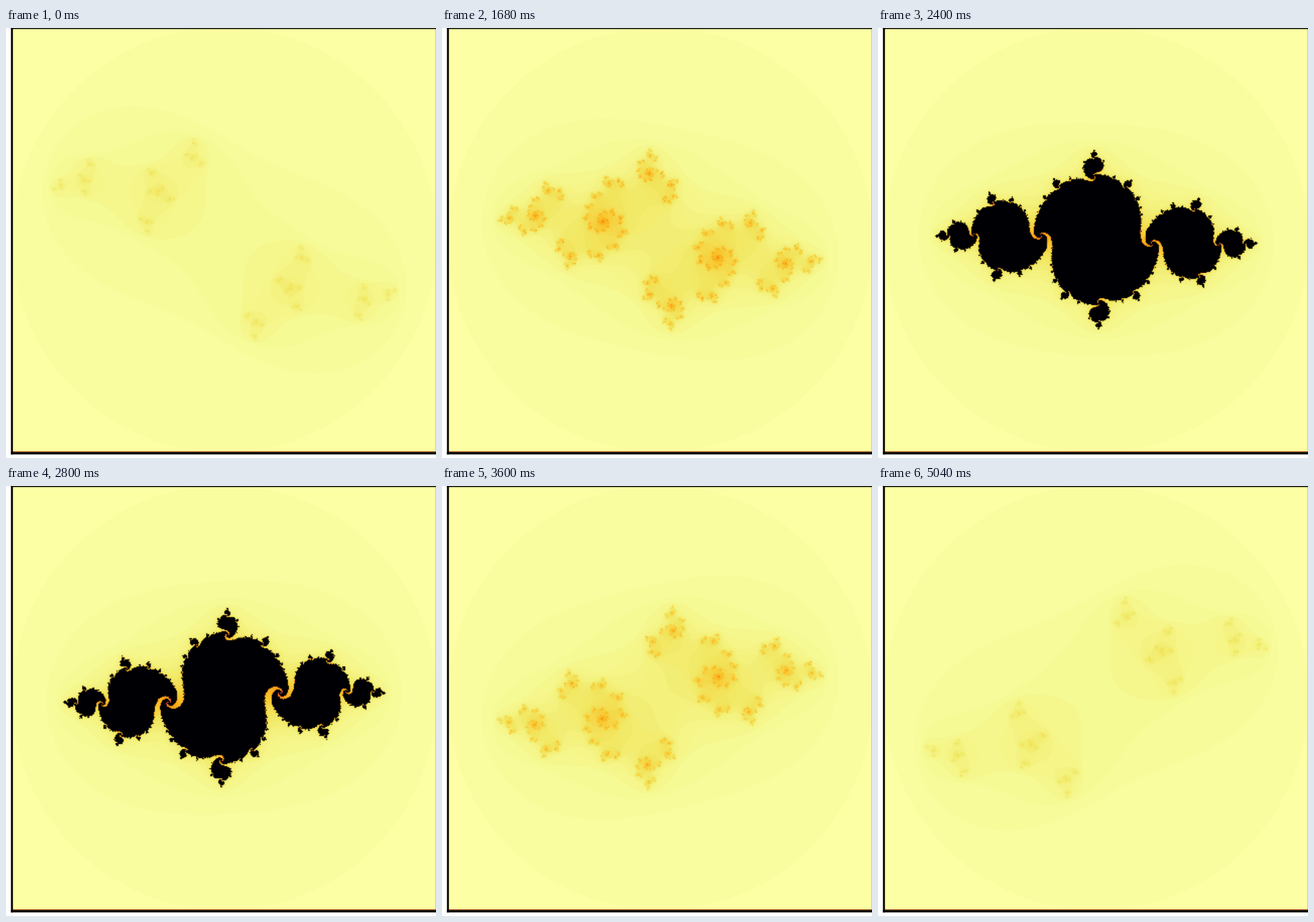
An HTML page with a canvas that plays this animation: 640x640 px, repeating every 5.12 s.

```html
<!DOCTYPE html>
<html lang="en">
<head>
<meta charset="utf-8">
<title>Julia set sweep</title>
<style>
  html, body { margin: 0; width: 100%; height: 100%; overflow: hidden; background: #fff; }
  canvas { display: block; width: 640px; height: 640px; }
</style>
</head>
<body>
<canvas id="stage" width="640" height="640"></canvas>
<script>
const STEP = 80, STEPS = 64;
const GRID = 420, SIZE = 630, SCALE = 158;
const LIMIT = 180;

// Reversed inferno; stops sit at squared positions, dense at the bright end.
const INFERNO = '#fcffa4 #f6fa95 #f1e761 #f9c228 #f98c0a #e05536 #a32d60 #520e6d #000004'.split(' ');

const ctx = document.getElementById('stage').getContext('2d');
const buffer = document.createElement('canvas');
buffer.width = buffer.height = GRID;
const bufferCtx = buffer.getContext('2d');
const image = bufferCtx.createImageData(GRID, GRID);
const pixels = new Uint32Array(image.data.buffer);
const cache = [];

// Paints the gradient on a strip and reads one colour per escape time.
function makePalette() {
  const strip = document.createElement('canvas');
  strip.width = LIMIT + 1;
  strip.height = 1;
  const g = strip.getContext('2d');
  const ramp = g.createLinearGradient(.5, 0, LIMIT + .5, 0);
  INFERNO.forEach((c, k) => ramp.addColorStop((k / (INFERNO.length - 1)) ** 2, c));
  g.fillStyle = ramp;
  g.fillRect(0, 0, strip.width, 1);
  return new Uint32Array(g.getImageData(0, 0, strip.width, 1).data.buffer);
}

const palette = makePalette();

function escapeTime(x, y, cx, cy) {
  let n = 0, xx = x * x, yy = y * y;
  while (n < LIMIT && xx + yy <= 4) {
    y = 2 * x * y + cy;
    x = xx - yy + cx;
    xx = x * x;
    yy = y * y;
    n++;
  }
  return n;
}

// The set is symmetric about the origin, so only half is computed.
function julia(cx, cy) {
  const counts = new Uint8Array(GRID * GRID);
  const unit = SIZE / GRID / SCALE, mid = (GRID - 1) / 2;
  const last = counts.length - 1;
  for (let row = 0, i = 0; row < GRID / 2; row++) {
    const y = (mid - row) * unit;
    for (let col = 0; col < GRID; col++, i++) {
      counts[i] = counts[last - i] = escapeTime((col - mid) * unit, y, cx, cy);
    }
  }
  return counts;
}

function bar(colour, x, y, w, h) {
  ctx.fillStyle = colour;
  ctx.fillRect(x, y, w, h);
}

function draw(step) {
  const counts = cache[step] || (cache[step] = julia(-0.8, 0.0318 * (32.2 - step)));
  for (let i = 0; i < counts.length; i++) pixels[i] = palette[counts[i]];
  bufferCtx.putImageData(image, 0, 0);

  bar('#fff', 0, 0, 640, 640);
  bar(INFERNO[0], 8, 0, 632, 632);
  ctx.filter = 'blur(.5px)';
  ctx.drawImage(buffer, 10, 0, SIZE, SIZE);
  ctx.filter = 'none';
  bar('#b4541e', 10, 630, 630, 1.2);
  bar('#000', 7.4, 0, 2.9, 634.6);
  bar('#000', 7.4, 0, 632.6, 1.5);
  bar('#000', 7.4, 631.2, 632.6, 3.4);
  bar('rgba(150,100,50,.35)', 639, 1, 1, 630);
}

let shown = -1;
function tick(now) {
  const step = Math.floor(now / STEP) % STEPS;
  if (step !== shown) draw(shown = step);
  requestAnimationFrame(tick);
}
draw(shown = 0);
requestAnimationFrame(tick);
</script>
</body>
</html>
```
